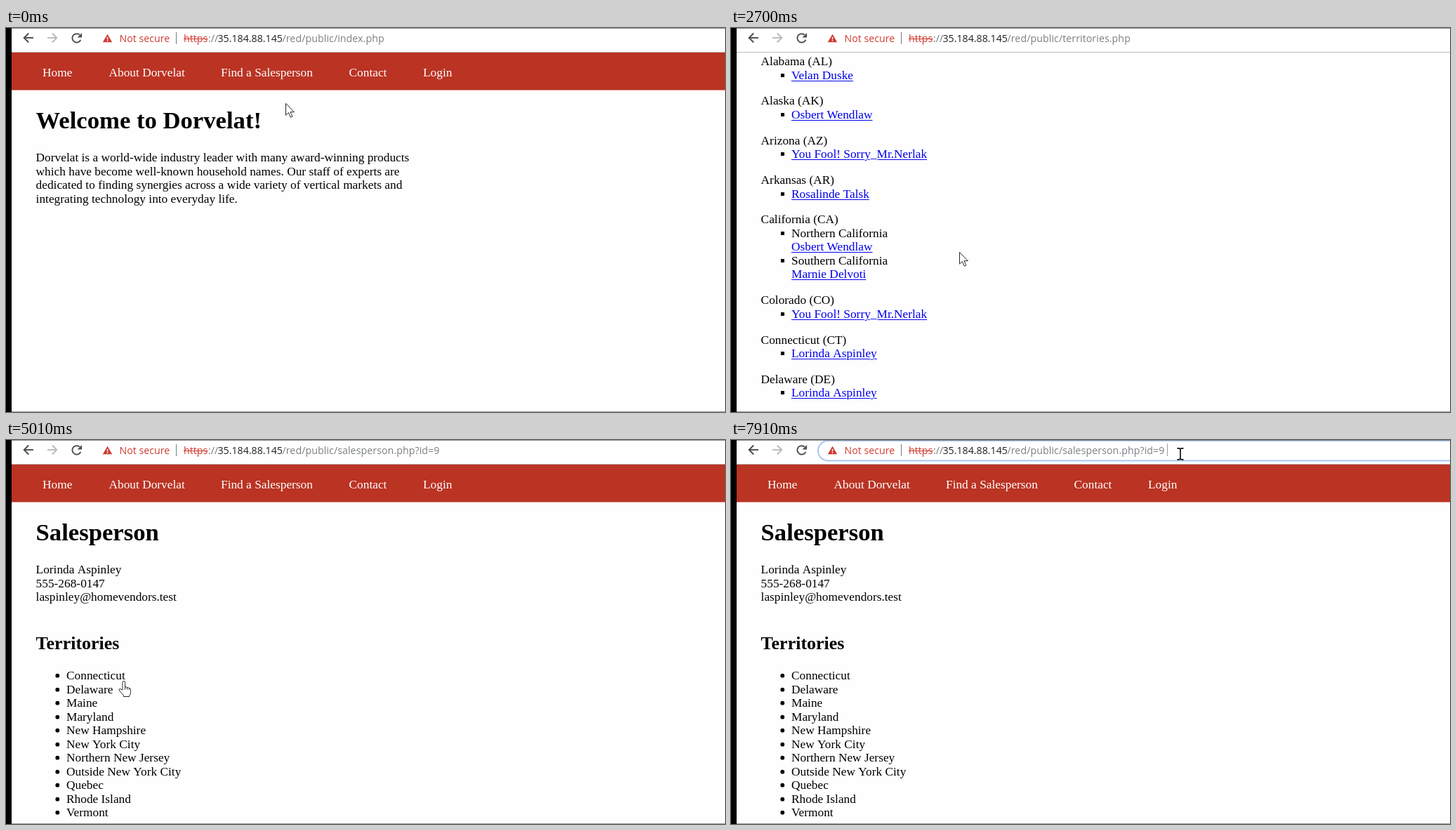
Animation, 1024 px wide and 547 px high, one loop 8 s. Source, as an HTML page with a canvas:

```html
<!DOCTYPE html>
<html lang="en">
<head>
<meta charset="utf-8">
<title>Browsing a site</title>
<style>
  html, body { margin: 0; width: 100%; height: 100%; overflow: hidden; background: #fff; }
  canvas { display: block; }
</style>
</head>
<body>
<canvas id="stage" width="1024" height="547"></canvas>
<script>
const ctx = document.getElementById('stage').getContext('2d');
const LOOP = 8000;

// The page is shown at 13/12 zoom
const ZOOM = 13 / 12, LINE = 18 * ZOOM, GAP = 16 * ZOOM;
const LEFT = 42.6, INDENT = 86, FIRST = 190.3;
const SERIF = '"Liberation Serif", "Times New Roman", serif';
const BODY = `${16 * ZOOM}px ${SERIF}`;
const BOLD = `bold ${16 * ZOOM}px ${SERIF}`;
const H1 = `bold ${32 * ZOOM}px ${SERIF}`;
const H2 = `bold ${24 * ZOOM}px ${SERIF}`;
const UI = '14.2px "Open Sans", "Noto Sans", sans-serif';
const RED = '#ba3323', WARN = '#cf3a30', PAPER = '#fefefe';

const CLICK = 1330, LIST = 1750, DETAIL = 5010, FOCUS = 7910;

// time, shape, x, y
const moves = [
  [0, 'arrow', 398, 107], [500, 'arrow', 394, 95], [630, 'arrow', 388, 78],
  [770, 'arrow', 382, 68], [900, 'hand', 376, 59], [1330, 'hand', 375, 59],
  [2030, 'arrow', 404, 140], [2150, 'arrow', 366, 250], [2270, 'arrow', 329, 313],
  [2420, 'arrow', 325, 319], [3870, 'arrow', 315, 326], [4020, 'arrow', 232, 340],
  [4140, 'hand', 180, 343], [4270, 'hand', 160, 343], [5570, 'arrow', 234, 256],
  [5710, 'arrow', 300, 274], [5830, 'arrow', 409, 191], [5950, 'arrow', 361, 203],
  [6100, 'arrow', 586, 167], [6250, 'arrow', 580, 190], [6530, 'arrow', 623, 91],
  [6680, 'beam', 619, 20], [6810, 'beam', 618.5, 15], [6960, 'beam', 621, 14],
  [7080, 'beam', 622, 13], [7230, 'beam', 663, 11], [7350, 'beam', 642.5, 11],
  [7500, 'beam', 640, 11]
];
// time, offset
const scrolls = [
  [0, 0], [2420, 1], [2550, 3], [2700, 210.8], [2850, 214], [3000, 263],
  [3130, 266.5], [3280, 319], [3410, 325]
];

const NAV = [['Home', 52], ['About Dorvelat', 146.5], ['Find a Salesperson', 306],
  ['Contact', 488.5], ['Login', 594]];

const ABOUT = [
  'Dorvelat is a world-wide industry leader with many award-winning products',
  'which have become well-known household names. Our staff of experts are',
  'dedicated to finding synergies across a wide variety of vertical markets and',
  'integrating technology into everyday life.'
];

const VELAN = 'Velan Duske', OSBERT = 'Osbert Wendlaw', FOOL = 'You Fool! Sorry_Mr.Nerlak',
  LORINDA = 'Lorinda Aspinley';
// state, then entries: a person, or a region with its person
const STATES = [
  ['Alabama (AL)', [VELAN]],
  ['Alaska (AK)', [OSBERT]],
  ['Arizona (AZ)', [FOOL]],
  ['Arkansas (AR)', ['Rosalinde Talsk']],
  ['California (CA)', [OSBERT, 'Northern California'], ['Marnie Delvoti', 'Southern California']],
  ['Colorado (CO)', [FOOL]],
  ['Connecticut (CT)', [LORINDA]],
  ['Delaware (DE)', [LORINDA]],
  ['Florida (FL)', [VELAN]],
  ['Georgia (GA)', [VELAN]]
];

const TERRITORIES = ['Connecticut', 'Delaware', 'Maine', 'Maryland', 'New Hampshire',
  'New York City', 'Northern New Jersey', 'Outside New York City', 'Quebec',
  'Rhode Island', 'Vermont'];

const latest = (steps, t) => steps.findLast(s => s[0] <= t);

function text(str, x, y, font = BODY, color = '#000') {
  ctx.font = font;
  ctx.fillStyle = color;
  ctx.fillText(str, x, Math.round(y));
}

function rect(x, y, w, h, color) {
  ctx.fillStyle = color;
  ctx.fillRect(x, y, w, h);
}

function line(points, color, width) {
  ctx.beginPath();
  points.forEach(([x, y]) => ctx.lineTo(x, y));
  ctx.strokeStyle = color;
  ctx.lineWidth = width;
  ctx.stroke();
}

function shape(points, color) {
  ctx.beginPath();
  points.forEach(([x, y]) => ctx.lineTo(x, y));
  ctx.closePath();
  ctx.fillStyle = color;
  ctx.fill();
}

// The underline leaves room for descenders
function link(str, x, y) {
  y = Math.round(y);
  ctx.font = BODY;
  rect(x, y + 2, ctx.measureText(str).width, 1, '#0000ee');
  ctx.strokeStyle = PAPER;
  ctx.lineWidth = 2;
  ctx.strokeText(str, x, y);
  text(str, x, y, BODY, '#0000ee');
}

const square = y => rect(71, Math.round(y) - 8, 5, 5, '#000');

function disc(y) {
  ctx.beginPath();
  ctx.arc(73.3, Math.round(y) - 5.3, 2.9, 0, 7);
  ctx.fillStyle = '#000';
  ctx.fill();
}

function homePage() {
  text('Welcome to Dorvelat!', LEFT, 143.4, H1);
  ABOUT.forEach((str, i) => text(str, LEFT, FIRST + i * LINE));
}

function listPage(top) {
  text('Find a Salesperson', LEFT, 143.4 - top, H1);
  let y = FIRST - top;
  text('Use the list below to find a salesperson nearby. We are ready to serve you!', LEFT, y);
  y += LINE + GAP;
  text('UNITED STATES', LEFT, y, BOLD);
  for (const [state, ...entries] of STATES) {
    y += LINE + GAP;
    text(state, LEFT, y);
    for (const [person, region] of entries) {
      y += LINE;
      square(y);
      if (region) {
        text(region, INDENT, y);
        y += LINE;
      }
      link(person, INDENT, y);
    }
  }
}

function detailPage() {
  text('Salesperson', LEFT, 143.4, H1);
  [LORINDA, '555-268-0147', 'laspinley@homevendors.test']
    .forEach((str, i) => text(str, LEFT, FIRST + i * LINE));
  text('Territories', LEFT, 298, H2);
  TERRITORIES.forEach((str, i) => {
    const y = 341.3 + i * LINE;
    disc(y);
    text(str, INDENT, y);
  });
}

function navBar(top) {
  rect(8, 35 - top, 1016, 53.5, RED);
  NAV.forEach(([str, x]) => text(str, x, 69 - top, BODY, '#fff'));
}

function pill(x, y, h) {
  ctx.beginPath();
  ctx.roundRect(x, y, 1100, h, h / 2);
}

function reloadIcon(loading) {
  const ink = '#4c4d50';
  if (loading) {
    line([[95.5, 9], [106.5, 20]], ink, 1.9);
    line([[106.5, 9], [95.5, 20]], ink, 1.9);
    return;
  }
  ctx.beginPath();
  ctx.arc(100.6, 14.4, 6.2, 0.4, 5.45);
  ctx.strokeStyle = ink;
  ctx.lineWidth = 1.9;
  ctx.stroke();
  shape([[108, 7], [108, 13.4], [101.6, 13.4]], ink);
}

function toolbar(t) {
  rect(8, 0, 1016, 35, '#fff');
  rect(8, 34, 1016, 1, '#bcbcbc');
  if (t >= FOCUS) {
    pill(124, 1, 28.5);
    ctx.strokeStyle = '#a9c6f3';
    ctx.lineWidth = 2;
    ctx.stroke();
  } else if (t >= 6680) {
    pill(125, 1, 29);
    ctx.fillStyle = t < 6810 ? '#f6f7f8' : t < 6960 ? '#eef0f2' : '#eff1f3';
    ctx.fill();
  }

  line([[39, 14], [26, 14]], '#4c4d50', 1.9);
  line([[32.2, 7.5], [25.7, 14], [32.2, 20.5]], '#4c4d50', 1.9);
  line([[59, 14], [72, 14]], '#bababa', 1.9);
  line([[65.8, 7.5], [72.3, 14], [65.8, 20.5]], '#bababa', 1.9);
  reloadIcon(t >= CLICK && t < LIST);

  shape([[144.5, 8.8], [151.2, 20.3], [137.8, 20.3]], WARN);
  rect(143.8, 12.8, 1.5, 3.6, '#fff');
  rect(143.8, 17.4, 1.5, 1.5, '#fff');
  text('Not secure', 161.5, 20, UI, WARN);
  rect(242, 6, 1, 17, '#77797c');
  text('https', 253, 20, UI, WARN);
  rect(253, 15, 35, 1, WARN);
  text('://', 288, 20, UI, '#74787c');
  text('35.184.88.145', 301.5, 20, UI, '#202124');
  const page = t < LIST ? 'index.php' : t < DETAIL ? 'territories.php' : 'salesperson.php?id=9';
  ctx.letterSpacing = '0.07px';
  text('/red/public/' + page, 393.5, 20, UI, '#7b7f83');
  ctx.letterSpacing = '0px';
  if (t >= FOCUS) rect(621, 5, 1, 18, '#9a9da1');
}

const ARROW = new Path2D('M.5.5V17.2l3.9-3.6 2.9 6.6 2.6-1.1-2.9-6.4h5.4z');
const HAND = new Path2D('M6 13V2.2a1.8 1.8 0 0 1 3.6 0V9q2.4-.8 3 .6 2-.6 2.6.9 2.2-.2 2.2 1.8v4' +
  'q0 3-1.8 5v1.2H7.6V21L3.4 16.4Q1 13.6 .8 12.4q.6-1.4 2.4-.6z');
const KNUCKLES = new Path2D('M9.6 9v3.5M12.6 9.6v3M15.2 10.5v2.3');
const BEAM = new Path2D('M-4.5 .8H-1.5L0 2 1.5 .8H4.5M0 2V15.5M-4.5 16.8H-1.5L0 15.5 1.5 16.8H4.5');

function pointer([, kind, x, y]) {
  ctx.save();
  ctx.translate(x, y);
  ctx.lineWidth = 1;
  ctx.strokeStyle = '#26262e';
  if (kind === 'beam') {
    ctx.strokeStyle = '#111';
    ctx.lineWidth = 1.7;
    ctx.stroke(BEAM);
  } else {
    const outline = kind === 'hand' ? HAND : ARROW;
    ctx.fillStyle = '#fff';
    ctx.fill(outline);
    ctx.stroke(outline);
    if (kind === 'hand') ctx.stroke(KNUCKLES);
  }
  ctx.restore();
}

function draw() {
  const t = performance.now() % LOOP;
  const top = t < DETAIL ? latest(scrolls, t)[1] : 0;
  rect(0, 0, 1024, 547, PAPER);
  navBar(top);
  if (t < LIST) homePage();
  else if (t < DETAIL) listPage(top);
  else detailPage();
  toolbar(t);
  rect(0, 0, 1024, 1, '#8a8a8a');
  rect(0, 546, 1024, 1, '#9a9a9a');
  rect(0, 0, 8, 547, '#000');
  pointer(latest(moves, t));
  requestAnimationFrame(draw);
}
draw();
</script>
</body>
</html>
```
